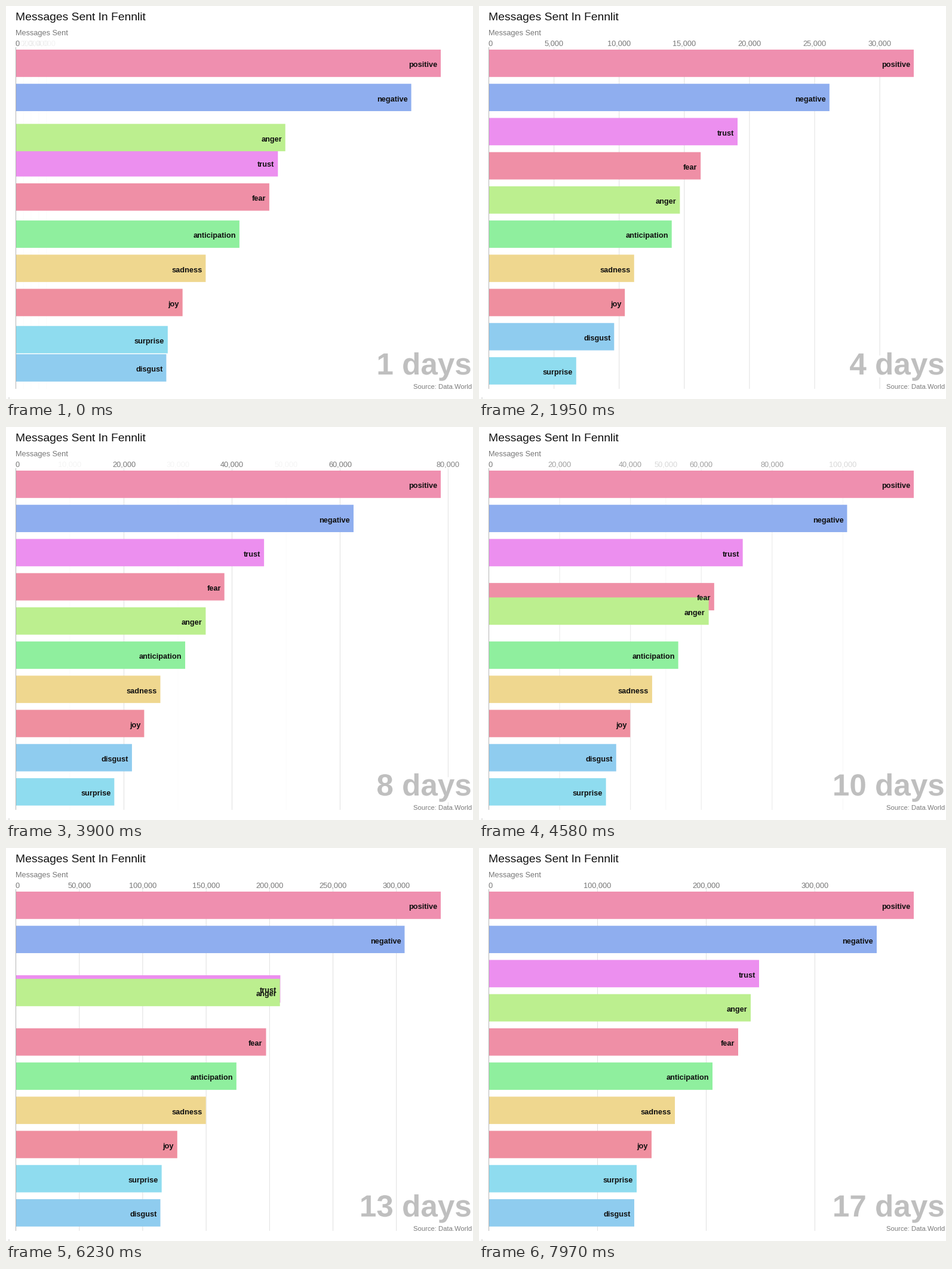
These frames come from a looping animation (782 px wide and 658 px high, 8 s). A matplotlib script:

```python
import math
from colorsys import hls_to_rgb

import matplotlib.pyplot as plt
import numpy as np
from matplotlib.animation import FuncAnimation
from matplotlib.patches import Rectangle
from matplotlib.patheffects import withStroke

W, H, DPI = 782, 658, 64
PX = 72 / DPI                      # points per pixel
STEP, FRAMES = 40, 200             # 8 s loop
LEFT, RIGHT = 16.5, 728            # ends of the longest bar
TOP, PITCH, BAR = 73, 57.22, 45.8
FONT = "Liberation Sans"

# Each bar: hue and its right edge on the key days.
KEY_DAYS = (0, 1, 6.33, 11.34, 16)
BARS = {
    "positive": (340, [RIGHT] * 5),
    "negative": (221, [682, 643, 542, 668, 666]),
    "trust": (298, [456, 448, 421, 456, 469]),
    "fear": (346, [443, 419, 333, 436, 434]),
    "anger": (92, [473, 412, 276, 460, 455]),
    "anticipation": (129, [390, 400, 261, 384, 391]),
    "sadness": (45, [337, 307, 222, 337, 328]),
    "joy": (350, [296, 292, 206, 286, 289]),
    "disgust": (202, [268, 273, 189, 258, 260]),
    "surprise": (192, [279, 185, 145, 259.5, 264]),
}
EDGES = [edges for _, edges in BARS.values()]


def day_at(ms):
    return np.interp(ms, [-28, 4430, 8450], [0, 9, 17])


def largest(day):
    """Value of the longest bar; the first axis is still empty."""
    if day == 0:
        return math.inf
    return np.interp(day, [1, 2, 6, 7, 9, 10, 11, 16],
                     [4800, 9550, 57e3, 62.4e3, 98.5e3, 260e3, 310e3, 391e3])


def edges_at(day):
    return np.array([np.interp(day, KEY_DAYS, e) for e in EDGES])


def ranks(day):
    return np.argsort(np.argsort(-edges_at(day)))


def ticks(top):
    """Round tick values, about five of them."""
    if math.isinf(top):
        return {0}
    raw = top / 5
    power = 10 ** math.floor(math.log10(raw))
    ratio = raw / power
    factor = (10 if ratio >= math.sqrt(50) else 5 if ratio >= math.sqrt(10)
              else 2 if ratio >= math.sqrt(2) else 1)
    return set(range(0, int(top) + 1, factor * power))


fig = plt.figure(figsize=(W / DPI, H / DPI), dpi=DPI, facecolor="white")
ax = fig.add_axes([0, 0, 1, 1])
ax.set(xlim=(0, W), ylim=(H, 0))
ax.axis("off")


def text(x, y, s, size, color, **kw):
    return ax.text(x, y, s, fontsize=size * PX, color=color, family=FONT,
                   va="baseline", **kw)


def vline(x, y0, y1, color, z):
    return ax.plot([x, x], [y0, y1], color=color, lw=PX, zorder=z,
                   solid_capstyle="butt", snap=False)[0]


def add_bar(hue):
    return ax.add_patch(Rectangle((LEFT, 0), 0, BAR, lw=0, zorder=3, snap=False,
                                  fc=hls_to_rgb(hue / 360, 0.75, 0.75)))


text(16, 24, "Messages Sent In Fennlit", 19.2, "#111111")
text(16, 49, "Messages Sent", 12.8, "#777777")
text(780, 641, "Source: Data.World", 11.2, "#7c7c7c", ha="right", zorder=8)
text(16, 67, "0", 12.8, "#777777")
vline(LEFT, 69, 641, "#b4b4b4", 4)
vline(5, 655, 658, "#c8c8c8", 4)

grid = [vline(0, 69, 641, "#e0e0e0", 1) for _ in range(16)]
marks = [text(0, 67, "", 12.8, "#777777", ha="center") for _ in grid]
bars = [add_bar(hue) for hue, _ in BARS.values()]
labels = [text(0, 0, name, 12.8, "#101010", weight="bold", ha="right", zorder=5)
          for name in BARS]
counter = text(780, 617, "", 51.2, "#bfbfbf", weight="bold", ha="right",
               zorder=7)
counter.set_path_effects([withStroke(linewidth=10 * PX, foreground="white")])


def draw_axis(day, p):
    old, new = largest(day), largest(day + 1)
    scale = (RIGHT - LEFT) * ((1 - p) / old + p / new)
    before, after = ticks(old), ticks(new)
    shown = [v for v in sorted((before | after) - {0})
             if LEFT + v * scale < W + 20]
    for artist in grid + marks:
        artist.set_visible(False)
    for v, line, mark in zip(shown, grid, marks):
        x = LEFT + v * scale
        # Kept ticks stay solid, new ones fade in, old ones fade out.
        alpha = p * (v in after) + (1 - p) * (v in before)
        line.set(xdata=[x, x], alpha=alpha, visible=True)
        mark.set(x=x, text=f"{v:,}", alpha=alpha, visible=True)


def draw_bars(day, p):
    slots = (1 - p) * ranks(day) + p * ranks(day + 1)
    for bar, label, slot, right in zip(bars, labels, slots, edges_at(day + p)):
        y = TOP + PITCH * slot
        bar.set(y=y, width=right - LEFT)
        label.set_position((right - 5.8, y + 29.3))


def update(frame):
    p, day = math.modf(day_at(frame * STEP + 15))
    draw_axis(day, p)
    draw_bars(day, p)
    counter.set_text(f"{day + 1:.0f} days")
    return []


anim = FuncAnimation(fig, update, frames=FRAMES, interval=STEP,
                     init_func=lambda: update(0), repeat=True, repeat_delay=0)
plt.show()
```
